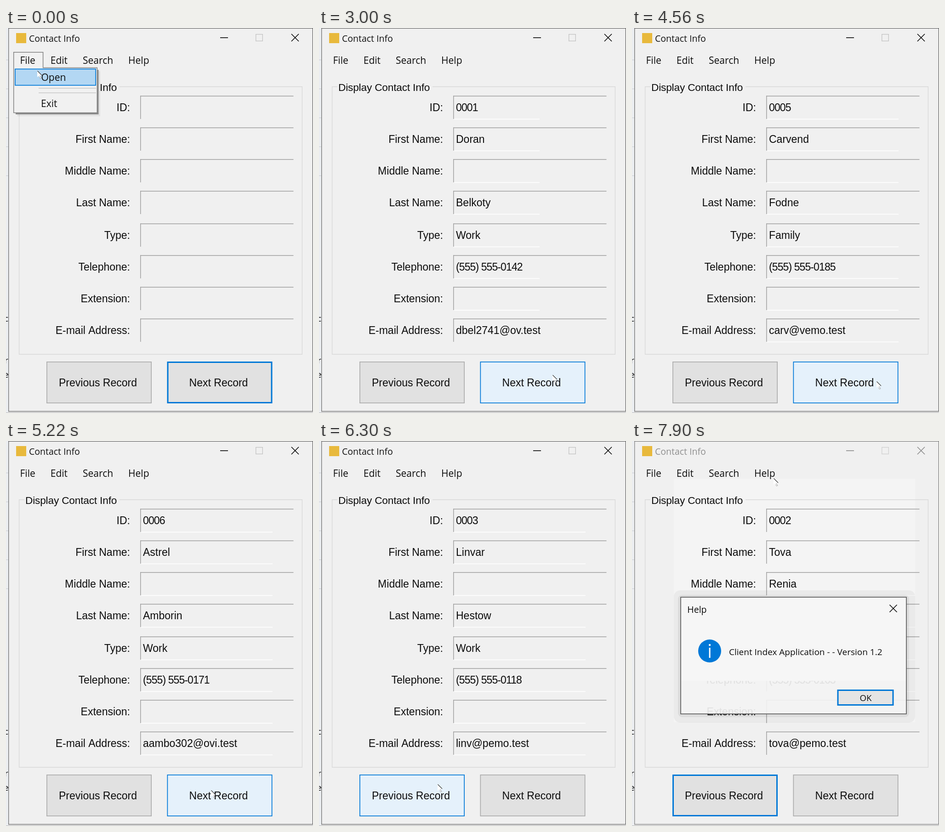
Animation, 668 px wide and 838 px high, one loop 8000 ms. Source, as an HTML page with a canvas:

```html
<!DOCTYPE html>
<html lang="en">
<head>
<meta charset="utf-8">
<title>Contact form</title>
<style>
  html, body { margin: 0; width: 100%; height: 100%; overflow: hidden; background: #f0f0f0; }
  canvas { display: block; }
</style>
</head>
<body>
<canvas id="stage" width="668" height="838"></canvas>
<script>
const ctx = document.getElementById('stage').getContext('2d');
const FORM = '"Liberation Sans", Arial, sans-serif';
const SYSTEM = '"Open Sans", "Noto Sans", sans-serif';
const BLUE = '#0078d7', FACE = '#f0f0f0', INK = '#0c0c0c';

const LOOP = 8000, TICK = 132, HOLD = 125;
const MENU_CLOSES = 400, DATA_LOADS = 1550, WINDOW_FADES = 7630;
const DIALOG_OPENS = 7780, DIALOG_SETTLES = 7900;

const labels = ['ID:', 'First Name:', 'Middle Name:', 'Last Name:',
  'Type:', 'Telephone:', 'Extension:', 'E-mail Address:'];

// first, middle, last, type, telephone, extension, e-mail
const records = [
  ['Doran', '', 'Belkoty', 'Work', '(555) 555-0142', '', 'dbel2741@ov.test'],
  ['Tova', 'Renia', 'Bredan-Sovik', 'School', '(555) 555-0163', '', 'tova@pemo.test'],
  ['Linvar', '', 'Hestow', 'Work', '(555) 555-0118', '', 'linv@pemo.test'],
  ['Kerwyn', '', 'Dossel', 'Family', '(555) 555-0127', '', 'kerw@vemo.test'],
  ['Carvend', '', 'Fodne', 'Family', '(555) 555-0185', '', 'carv@vemo.test'],
  ['Astrel', '', 'Amborin', 'Work', '(555) 555-0171', '', 'aambo302@ovi.test']
];

// Each button is clicked `clicks` times at an even pace.
const prev = { label: 'Previous Record', x: 88, center: 200, first: 5610, gap: 270, clicks: 4 };
const next = { label: 'Next Record', x: 350.5, center: 462.5, first: 3290, gap: 380, clicks: 5 };
const HELP = { x: 251, y: 51, w: 79, h: 37 };

// The pointer eases from rest to rest; bend bows its path sideways.
const rest = { x: 68, y: 93 };
const moves = [
  { start: 2565, end: 3125, x: 502, y: 771, bend: 220 },
  { start: 4510, end: 4690, x: 561, y: 768, bend: 0 },
  { start: 5130, end: 5660, x: 258, y: 747, bend: 0 },
  { start: 6600, end: 6920, x: 214, y: 262, bend: 115 },
  { start: 6990, end: 7320, x: 308, y: 81, bend: 60 }
];

const clamp = (v, lo, hi) => Math.min(hi, Math.max(lo, v));
const easeOut = u => 1 - (1 - u) ** 3;
const inside = (p, r) => p.x >= r.x && p.x < r.x + r.w && p.y >= r.y && p.y < r.y + r.h;

function cursorAt(t) {
  const now = Math.floor((t - 2700) / TICK) * TICK + 2700;
  let { x, y } = rest;
  for (const m of moves) {
    const e = easeOut(clamp((now - m.start) / (m.end - m.start), 0, 1));
    x += (m.x - x) * e + m.bend * Math.sin(Math.PI * e);
    y += (m.y - y) * e;
  }
  return { x: Math.round(x), y: Math.round(y) };
}

function releases(button, t) {
  return clamp(Math.floor((t - button.first - HOLD) / button.gap) + 1, 0, button.clicks);
}

function isPressed(button, t) {
  const since = t - button.first;
  return since >= 0 && since < button.gap * button.clicks && since % button.gap < HOLD;
}

function box(x, y, w, h, color) {
  ctx.fillStyle = color;
  ctx.fillRect(x, y, w, h);
}

// Rectangle whose border lies inside its bounds.
function frame(x, y, w, h, fill, edge, width) {
  if (fill) box(x, y, w, h, fill);
  ctx.strokeStyle = edge;
  ctx.lineWidth = width;
  ctx.strokeRect(x + width / 2, y + width / 2, w - width, h - width);
}

function roundBox(x, y, w, h, r, color) {
  ctx.fillStyle = color;
  ctx.beginPath();
  ctx.roundRect(x, y, w, h, r);
  ctx.fill();
}

function line(color, width, ...points) {
  ctx.strokeStyle = color;
  ctx.lineWidth = width;
  ctx.beginPath();
  points.forEach(([x, y]) => ctx.lineTo(x, y));
  ctx.stroke();
}

function text(str, x, y, size, family, color = INK, align = 'left', spacing = 0) {
  ctx.font = `${size}px ${family}`;
  ctx.textAlign = align;
  ctx.letterSpacing = spacing + 'px';
  ctx.fillStyle = color;
  ctx.fillText(str, x, y);
  ctx.letterSpacing = '0px';
}

function cross(x, y, r, color) {
  line(color, 1.7, [x - r, y - r], [x + r, y + r]);
  line(color, 1.7, [x + r, y - r], [x - r, y + r]);
}

function drawWindow(active) {
  box(0, 0, 668, 838, FACE);
  box(0, 0, 5, 838, '#eceef1');
  for (let y = 69; y < 360; y += 63) box(0, y, 5, 1, '#c9ccd1');
  ctx.save();
  ctx.beginPath();
  ctx.rect(0, 600, 5, 200);
  ctx.clip();
  text('c', -4, 639, 19, SYSTEM);
  text('r', -3, 730, 19, SYSTEM);
  text('e', -5, 761, 19, SYSTEM);
  ctx.restore();

  const edge = active ? '#707070' : '#858585';
  frame(5, 0, 663, 835, null, edge, 1.3);
  box(5, 835, 662, 2, '#e3e3e3');
  box(0, 837, 668, 1, '#b4b4b4');

  const ink = active ? '#111' : '#8f8f8f';
  box(22, 11, 22, 22, '#e8b93c');
  text('Contact Info', 50, 30, 19.5, SYSTEM, ink);
  box(466, 20.3, 17, 1.7, ink);
  frame(543, 13, 16, 16, null, active ? '#c6c6c6' : '#d2d2d2', 1.4);
  cross(629, 21, 8, ink);
}

function drawMenuBar(helpHot) {
  if (helpHot) frame(HELP.x, HELP.y, HELP.w, HELP.h, '#b3d7f3', BLUE, 1.6);
  let x = 30.5;
  for (const name of ['File', 'Edit', 'Search', 'Help']) {
    text(name, x, 78, 21, SYSTEM);
    x += ctx.measureText(name).width + 33;
  }
}

function drawFileMenu() {
  box(24, 94, 181, 98, 'rgba(0,0,0,.06)');
  box(21, 91, 180.5, 97, '#8c8c8c');
  box(16, 86, 183, 99, '#f1f1f1');
  box(16, 52, 65, 36, '#f1f1f1');
  line('#808080', 1.5, [16.7, 185], [16.7, 52.7], [80.6, 52.7], [80.6, 86.6],
    [198.3, 86.6], [198.3, 184.4], [16.7, 184.4]);
  text('File', 30.5, 78, 21, SYSTEM);
  frame(19, 88.5, 177, 37, '#b3d7f3', BLUE, 1.7);
  text('Open', 76.5, 115, 21, SYSTEM);
  box(71, 130.5, 125, 1.2, '#bdbdbd');
  box(71, 140.5, 125, 1.2, '#bdbdbd');
  text('Exit', 76, 172, 21, SYSTEM);
}

// Right end of the fields' bright lower edges, which show only where repainted.
function lipEnd(t) {
  if (t < DATA_LOADS) return 0;
  if (t < next.first) return 480;
  if (t < WINDOW_FADES) return 580;
  return t < DIALOG_OPENS ? 0 : 616;
}

function drawForm(t) {
  line('#d9d9d9', 1.4, [40, 127.7], [28.6, 127.7], [28.6, 710.3],
    [644.4, 710.3], [644.4, 127.7], [247, 127.7]);
  text('Display Contact Info', 42, 137, 22.6, FORM, INK, 'left', -0.15);

  const index = releases(next, t) - releases(prev, t);
  const values = t < DATA_LOADS ? [] : ['000' + (index + 1), ...records[index]];
  const lip = lipEnd(t);
  labels.forEach((label, i) => {
    const top = 147.5 + 69 * i + (i > 3 ? 2 : 0);
    const lit = t < DIALOG_OPENS ? i < 7 || t > next.first : i > 1 && i < 6;
    if (lip && lit) box(293, top + 50, lip - 293, 1.6, '#fff');
    box(292, top, 333.5, 1.5, '#a0a0a0');
    box(292, top, 1.5, 50.5, '#a0a0a0');
    text(label, 270, top + 33.2, 23, FORM, INK, 'right');
    const value = values[i] || '';
    const spacing = /[a-z]/.test(value) ? 0 : -0.9;
    text(value, 298, top + 33.2, 23, FORM, INK, 'left', spacing);
  });
}

function drawButton(button, t, cursor, focused) {
  const area = { x: button.x, y: 726, w: 229, h: 91 };
  let look = ['#e1e1e1', '#adadad', 1.7];
  if (isPressed(button, t)) look = ['#cce4f7', '#005499', 1.7];
  else if (inside(cursor, area)) look = ['#e5f1fb', BLUE, 1.7];
  else if (focused) look = ['#e1e1e1', BLUE, 3];
  frame(area.x, area.y, area.w, area.h, ...look);
  text(button.label, button.center, 780, 23, FORM, INK, 'center');
}

function drawDialog(settled) {
  const veil = 'rgba(246,246,246,.91)';
  roundBox(91, 325, 525, 288, 14, 'rgba(0,0,0,.045)');
  roundBox(100, 335, 503, 266, 9, 'rgba(0,0,0,.06)');
  box(106, 340, 491, 182, settled ? '#f6f6f6' : veil);
  box(106, 522, 491, 72, veil);
  frame(105.2, 339.2, 492.6, 255.6, null, '#555', 1.6);
  text('Help', 120.3, 374, 19.5, SYSTEM);
  cross(568.5, 364.5, 8, '#111');

  roundBox(144, 432, 50, 50, 25, BLUE);
  box(167.3, 442, 3.6, 4, '#fff');
  box(167.6, 450, 3, 22, '#fff');

  text('Client Index Application - - Version 1.2', 211, 465.5, 19, SYSTEM);
  frame(446.5, 541, 123, 35, '#e4e4e4', BLUE, 3);
  text('OK', 508.5, 566, 18.6, SYSTEM, INK, 'center');
}

function drawCursor({ x, y }) {
  ctx.save();
  ctx.translate(x, y);
  ctx.fillStyle = '#fff';
  ctx.beginPath();
  [[0, 0], [0, 14], [3, 11], [6, 17], [8.5, 16], [6, 10.5], [10, 10.5]]
    .forEach(([px, py]) => ctx.lineTo(px, py));
  ctx.fill();
  line('#333', 1.1, [0.5, 0.5], [10, 10]);
  ctx.setLineDash([1.5, 1.2]);
  line('#555', 1, [5.5, 11], [9, 16], [6.5, 17], [4.5, 13]);
  ctx.restore();
}

function draw(t) {
  const cursor = cursorAt(t);
  const active = t < WINDOW_FADES;
  const prevFocused = t >= prev.first;
  drawWindow(active);
  if (t >= DIALOG_OPENS) box(91, 82, 525, 530, '#f4f4f4');
  drawMenuBar(active && inside(cursor, HELP));
  drawForm(t);
  drawButton(prev, t, cursor, prevFocused);
  drawButton(next, t, cursor, !prevFocused);
  if (t < MENU_CLOSES) drawFileMenu();
  if (t >= DIALOG_OPENS) drawDialog(t >= DIALOG_SETTLES);
  drawCursor(cursor);
}

const start = performance.now();
function tick() {
  draw((performance.now() - start) % LOOP);
  requestAnimationFrame(tick);
}
tick();
</script>
</body>
</html>
```
